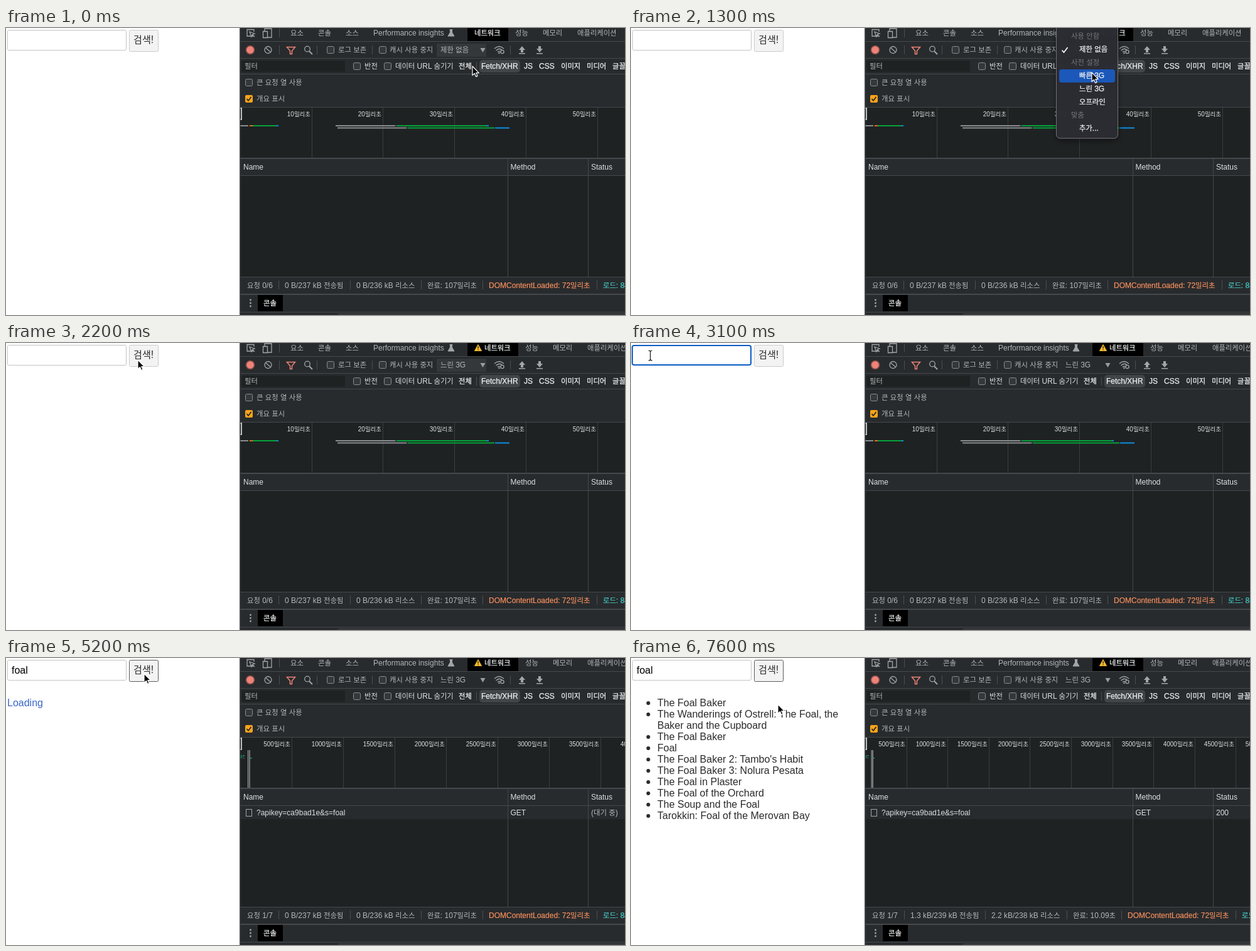
An HTML page for the animation above (7700 ms loop, 986 by 458 pixels).

```html
<!DOCTYPE html>
<html lang="ko">
<head>
<meta charset="utf-8">
<title>Slow network search</title>
<style>
  html, body { margin: 0; width: 100%; height: 100%; overflow: hidden; background: #fff; }
  svg { display: block; }
  text { font: 12px "Liberation Sans", "Noto Sans CJK KR", "Noto Sans CJK", sans-serif; fill: #b3b7ba; white-space: pre; }
  .ko { font-size: .945em; }
  .hi { fill: #eef0f1; font-weight: 500; stroke: #eef0f1; stroke-width: .25px; }
  .mid { fill: #dcdfe1; }
  .dim { fill: #75797c; }
  .tick { font-size: 10px; fill: #dcdfe1; text-anchor: end; font-weight: 500; }
  .page { font-size: 16px; fill: #2b2b2b; }
  .line { fill: none; stroke: #a2a6a9; stroke-width: 1.3; }
</style>
</head>
<body>
<svg id="stage" width="986" height="458" viewBox="0 0 986 458"></svg>
<script>
const LOOP = 7700, STEP = 100;
const MENU_OPEN = 600, MENU_CLOSE = 1900, FOCUS = 2800, CLICK = 5000, REQUEST = 5100, DONE = 7200;
const QUERY = 'foal', KEYS = [3900, 4000, 4200, 4300];
const LEFT = 373, BAR = '#282b2d', BODY = '#1f2223', EDGE = '#45494c';

// time, x, y of the pointer
const PATH = [
  [0, 743, 61], [100, 742, 60], [200, 742, 60], [500, 735, 36], [900, 734, 46], [1000, 734, 49],
  [1100, 734, 54], [1500, 734, 88], [1800, 734, 88], [1900, 660, 75], [2000, 480, 50],
  [2200, 210, 27], [2400, 144, 22], [2700, 50, 20], [3200, 26, 20], [3400, 26, 20], [3700, 21, 20],
  [4600, 21, 20], [4800, 120, 21], [5000, 218, 25], [5200, 220, 25], [5800, 220, 25],
  [6600, 234, 74], [LOOP, 234, 74]
];

const MENU = ['사용 안함', '제한 없음', '사전 설정', '빠른 3G', '느린 3G', '오프라인', '맞춤', '추가...'];
const HEADINGS = [0, 2, 6];

// a leading blank marks a wrapped line
const RESULTS = [
  'The Foal Baker', 'The Wanderings of Ostrell: The Foal, the', ' Baker and the Cupboard',
  'The Foal Baker', 'Foal', "The Foal Baker 2: Tambo's Habit", 'The Foal Baker 3: Nolura Pesata',
  'The Foal in Plaster', 'The Foal of the Orchard', 'The Soup and the Foal',
  'Tarokkin: Foal of the Merovan Bay'
];

const lerp = (a, b, p) => a + (b - a) * Math.min(1, Math.max(0, p));
const rect = (x, y, w, h, fill, more = '') =>
  `<rect x="${x}" y="${y}" width="${w}" height="${h}" fill="${fill}" ${more}/>`;
const path = (d, more = 'class="line"') => `<path d="${d}" ${more}/>`;
const circle = (x, y, r, more) => `<circle cx="${x}" cy="${y}" r="${r}" ${more}/>`;
const label = (x, y, s, cls = '', more = '') =>
  `<text x="${x}" y="${y}" class="${cls}" ${more}>` +
  s.replace(/&/g, '&amp;').replace(/[가-힣]+/g, '<tspan class="ko">$&</tspan>') + '</text>';
const hline = y => rect(LEFT, y, 613, 1, EDGE);
const sep = (x, y) => rect(x, y, 1, 14, '#4b4f52');
const box = (x, y) => rect(x + .5, y + .5, 11, 11, '#35383a', 'rx="2" stroke="#8a8e91"');

function pointerAt(t) {
  const i = Math.max(1, PATH.findIndex(k => k[0] >= t));
  const [t0, x0, y0] = PATH[i - 1], [t1, x1, y1] = PATH[i];
  const p = (t - t0) / (t1 - t0);
  return [lerp(x0, x1, p), lerp(y0, y1, p)];
}

function page(t) {
  const focused = t >= FOCUS && t < CLICK, pressed = t >= CLICK;
  const typed = QUERY.slice(0, KEYS.filter(k => t >= k).length);
  let s = focused
    ? rect(2, 4, 189, 31, '#fff', 'rx="3" stroke="#0b5cc4" stroke-width="2"')
    : rect(2.5, 3.5, 189, 32, '#fff', 'rx="2" stroke="#c3c3c3"');
  s += label(9, 25, typed, 'page', 'style="fill:#000"');
  s += rect(196.5, 3.5, 46, 34, '#f3f3f3', `rx="2" stroke="${pressed ? '#5c5c5c' : '#cbcbcb'}"`);
  s += label(203, 24, '검색!', 'page');
  if (t >= DONE) {
    RESULTS.forEach((name, i) => {
      const y = 77 + 18 * i;
      if (name[0] !== ' ') s += circle(27.5, y - 5, 3, 'fill="#2b2b2b"');
      s += label(42, y, name.trim(), 'page');
    });
  } else if (pressed) s += label(2, 77, 'Loading', 'page', 'style="fill:#3a66cc"');
  return s;
}

function tabs(slow) {
  const shift = slow ? 16 : 0;
  let s = path('M394 13H384V2.5H395V6M388 6l8 3-3.5 1.5L391 14zM392 10l4 4') +
    path('M412 6V1H423V15H417M409.5 5.5H416.5V15.5H409.5z') + sep(435, 1);
  [['요소', 453], ['콘솔', 497], ['소스', 541], ['Performance insights', 585],
   ['성능', 811 + shift], ['메모리', 855 + shift], ['애플리케이션', 910 + shift]]
    .forEach(([name, x]) => s += label(x, 12, name));
  s += path('M706.5 2.5H711.5M707.5 3V7L704 13H714L710.5 7V3z', 'fill="#a2a6a9" stroke="#a2a6a9"');
  s += rect(735, 0, 65 + shift, 21, '#000') + label(746 + shift, 12, '네트워크', 'hi');
  if (slow) s += path('M752 2.5L757.5 12.5H746.5z', 'fill="#f8bb2c" stroke="#f8bb2c" stroke-linejoin="round"') +
    rect(751.4, 5, 1.3, 4, '#222') + rect(751.4, 10, 1.3, 1.4, '#222');
  return s + hline(21);
}

function toolbar(t, slow) {
  let s = circle(389, 35, 6.5, 'fill="#ee8379" stroke="#8b4f4a" stroke-width="1.5"');
  s += circle(417.5, 35, 5.5, 'class="line"') + path('M413.5 31.5L421.5 38.5');
  s += path('M447.5 30.5H460.5L455.5 36.5V41.5H452.5V36.5z', 'fill="none" stroke="#ee8478" stroke-width="1.5"');
  s += circle(480, 33.5, 4.3, 'class="line"') + path('M483 37L488 42', 'stroke="#a2a6a9" stroke-width="2"');
  s += sep(435, 28) + sep(495, 28) + sep(583, 28) + sep(803, 28);
  s += box(511, 29) + label(529, 39, '로그 보존') + box(594, 29) + label(611, 39, '캐시 사용 중지');
  if (t < FOCUS) s += rect(686, 25, 79, 21, '#34383a', 'rx="1"');
  s += label(692, 39, slow ? '느린 3G' : '제한 없음');
  s += path('M755.5 32H763.5L759.5 39z', 'fill="#9a9ea1"');
  s += path('M778 33Q785.5 26 793 33M780.5 36Q785.5 31 790 35M783 38.5Q785.5 36 787 38') +
    circle(790.5, 38, 2.6, 'class="line"') + circle(785.5, 40, 1.2, 'fill="#a2a6a9"');
  s += path('M822 29L827 35H824V39H820V35H817zM817 40H827V41.5H817z' +
    'M850 39L845 33H848V29H852V33H855zM845 40H855V41.5H845z', 'fill="#a2a6a9"');
  return s + hline(48);
}

function filters() {
  let s = rect(375, 52, 165, 18, BODY) + label(380, 65, '필터');
  s += box(553, 55) + label(571, 65, '반전', 'mid') + box(602, 55) + label(620, 65, '데이터 URL 숨기기', 'mid');
  s += sep(749, 54) + rect(754, 51, 65, 20, '#414547', 'rx="5"');
  [['전체', 721], ['Fetch/XHR', 757], ['JS', 825], ['CSS', 849], ['이미지', 884], ['미디어', 925], ['글꼴', 966]]
    .forEach(([name, x]) => s += label(x, 65, name, 'hi'));
  s += hline(73) + box(381, 81) + label(399, 91, '큰 요청 열 사용');
  s += rect(381, 107, 12, 12, '#f9a41a', 'rx="2"') +
    path('M383.5 113L386 116L390.5 110', 'fill="none" stroke="#222" stroke-width="1.7"');
  return s + label(399, 117, '개요 표시');
}

function overview(t) {
  const late = t >= REQUEST;
  const gap = late ? lerp(82, 65.6, (t - 5800) / 1200) : 113.7;
  let s = rect(LEFT, 126, 613, 82, BODY) + hline(126);
  for (let k = 1; LEFT + gap * k < 1040; k++) {
    const x = Math.round(LEFT + gap * k);
    s += rect(x, 127, 1, 80, '#3a3e40') + label(x - 2, 141, `${k * (late ? 500 : 10)}밀리초`, 'tick');
  }
  const bar = (x, end, y, fill) => rect(x, y, end - x, 2, fill);
  if (late) {
    const z = gap / 82;
    s += rect(LEFT + 12 * z, 147, 1, 60, '#a9b3bd') + rect(LEFT + 14.5 * z, 147, 1, 60, '#d4d4d4');
    s += rect(LEFT + 1, 155, 2 * z, 5, '#146b53') + rect(LEFT + 4 * z, 155, 3 * z, 2, '#1a7a66') +
      rect(LEFT + 4 * z, 159, 3 * z, 1, '#1a7a66') + rect(LEFT + 16 * z, 159, 3 * z, 1.5, '#159083');
  } else {
    const grey = '#898d8f', green = '#05a33b', blue = '#0d8de0';
    s += bar(LEFT, 386, 155, grey) + bar(388, 393, 155, '#d9731c') + bar(393, 431, 155, green) + bar(431, 434, 155, blue);
    s += bar(525, 619, 155, grey) + bar(619, 621, 155, '#8a5d92') + bar(622, 766, 155, green) + bar(766, 769, 155, blue);
    s += bar(528, 637, 158.5, grey) + bar(637, 639, 158.5, '#8a5d92') + bar(640, 778, 158.5, green) + bar(779, 802, 158.5, blue);
  }
  s += path('M373 128H375V146H373', 'fill="none" stroke="#eee" stroke-width="1.5"');
  return s + rect(LEFT, 207, 613, 2, EDGE);
}

function table(t) {
  let s = rect(LEFT, 209, 613, 189, BODY) + rect(LEFT, 209, 613, 26, BAR) + hline(235);
  if (t >= REQUEST) {
    s += rect(LEFT, 236, 613, 21, BAR) + rect(382.5, 241.5, 9, 11, 'none', 'stroke="#a2a6a9"');
    s += label(399, 251, '?apikey=ca9bad1e&s=' + QUERY, 'mid') + label(803.5, 251, 'GET', 'mid');
    s += t >= DONE ? label(932, 251, '200', 'mid') : label(932, 251, '(대기 중)');
  }
  s += rect(799, 209, 1, 189, EDGE) + rect(927, 209, 1, 189, EDGE);
  return s + label(378, 226, 'Name', 'mid') + label(803.5, 226, 'Method', 'mid') + label(932, 226, 'Status', 'mid');
}

function summary(t) {
  const done = t >= DONE;
  const texts = ['요청 ' + (t >= REQUEST ? '1/7' : '0/6'),
    done ? '1.3 kB/239 kB 전송됨' : '0 B/237 kB 전송됨',
    done ? '2.2 kB/238 kB 리소스' : '0 B/236 kB 리소스',
    done ? '완료: 10.09초' : '완료: 107밀리초',
    'DOMContentLoaded: 72밀리초', '로드: 84밀리초'];
  const xs = done ? [384, 445, 574, 704, 791, 973] : [384, 444, 558, 671, 769, 951];
  const tint = { 4: '#f58f5f', 5: '#45d0cb' };
  let s = hline(397);
  texts.forEach((v, i) => {
    if (i) s += sep(xs[i] - 10, 403);
    s += label(xs[i], 415, v, '', tint[i] ? `style="fill:${tint[i]};stroke:${tint[i]};stroke-width:.2px"` : '');
  });
  s += rect(LEFT, 424, 613, 2, EDGE);
  for (const y of [434, 439, 444]) s += circle(389.5, y, 1.4, 'fill="#a2a6a9"');
  s += rect(401, 426, 40, 26, '#000') + label(410, 443, '콘솔', 'hi');
  return s + hline(453) + rect(529, 456, 457, 1, '#4b4f52');
}

function menu(t, y) {
  if (t < MENU_OPEN || t >= MENU_CLOSE) return '';
  const hover = Math.floor((y - 3) / 21);
  let s = rect(677.5, -12, 98, 188, '#2b2d32', 'rx="6" stroke="#707377" filter="url(#shade)" fill-opacity=".97"');
  MENU.forEach((name, i) => {
    const head = HEADINGS.includes(i);
    if (i === hover && !head && t >= 1100) s += rect(682, 3 + 21 * i, 89, 21, '#1b58b9', 'rx="4"');
    s += label(head ? 701 : 714, 17 + 21 * i, name, head ? 'dim' : 'hi');
  });
  s += path('M686.5 35.5L689.5 39L695.5 31', 'fill="none" stroke="#fff" stroke-width="1.7"');
  return `<g opacity="${t >= 1800 ? .88 : 1}">${s}</g>`;
}

function pointer(t, x, y) {
  if (t >= KEYS[0] && t < 4600) return '';
  const inInput = x < 192 && y > 3 && y < 36;
  const shape = inInput
    ? path('M-3-8Q0-8 0-6Q0-8 3-8M0-6V6M-3 8Q0 8 0 6Q0 8 3 8', 'fill="none" stroke="#111" stroke-width="1.2"')
    : path('M0 0V14.5L3.4 11.5L5.6 16.6L8 15.6L5.8 10.6H10.3z',
        'fill="#000" stroke="#fff" stroke-width="1.2" stroke-linejoin="round"');
  return `<g transform="translate(${x} ${y})">${shape}</g>`;
}

function scene(t) {
  const slow = t >= MENU_CLOSE, [x, y] = pointerAt(t);
  return '<defs><filter id="shade" x="-30%" y="-20%" width="160%" height="140%">' +
    '<feDropShadow dx="0" dy="4" stdDeviation="5" flood-opacity=".45"/></filter></defs>' +
    rect(0, 0, 986, 458, '#fff') + page(t) + rect(LEFT, 0, 613, 458, BAR) +
    tabs(slow) + toolbar(t, slow) + filters() + overview(t) + table(t) + summary(t) +
    rect(372, 0, 1.5, 458, '#4a4d50') + menu(t, y) + pointer(t, x, y);
}

const stage = document.getElementById('stage');
const start = performance.now();
let shown = -1;
function tick() {
  const t = Math.floor((performance.now() - start) % LOOP / STEP) * STEP;
  if (t !== shown) stage.innerHTML = scene(shown = t);
  requestAnimationFrame(tick);
}
tick();
</script>
</body>
</html>
```
